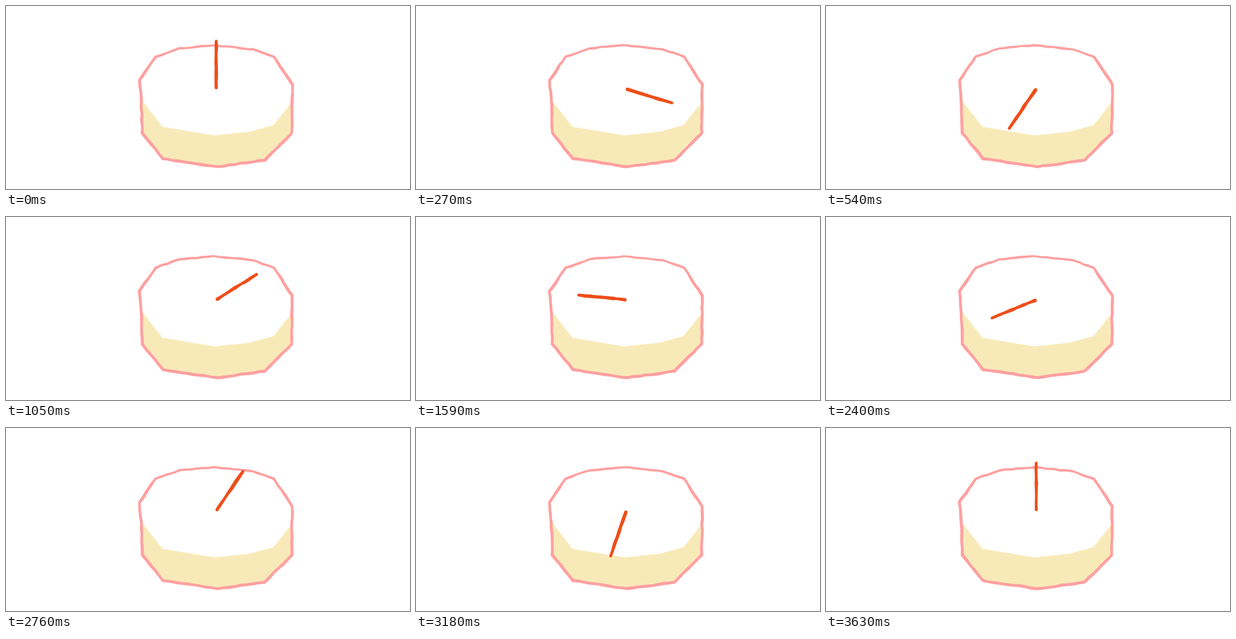
These frames come from a looping animation (772x350 px, 3660 ms). An HTML page with a canvas:

```html
<!DOCTYPE html>
<html lang="en">
<head>
<meta charset="utf-8">
<title>Spinning dial</title>
<style>
  html, body { margin: 0; width: 772px; height: 350px; overflow: hidden; background: #fff; }
  canvas { display: block; }
</style>
</head>
<body>
<canvas id="stage" width="772" height="350"></canvas>
<script>
const ctx = document.getElementById('stage').getContext('2d');
const LOOP = 3660, STEP = 30, LAST = LOOP - STEP;
const PINK = '#ffa0a0', CREAM = '#f8eab8', RED = '#ee4e1a';
const PIVOT = [401.7, 158.5];

const TOP = [[255, 142], [286, 97], [331, 81], [397, 75], [472, 83], [512, 97], [547, 150]];
const BASE = [[546, 243], [494, 295], [404, 307.5], [300, 292], [260.5, 243]];
const ICING = [[260, 181], [299, 231], [398, 247.5], [465, 240.5], [511, 228], [544.5, 186]];

const mix = (a, b, k) => a + (b - a) * k;

function seeded(seed) {
  let s = Math.imul(seed + 1, 2654435761);
  return () => {
    s = (s + 0x6D2B79F5) | 0;
    let x = Math.imul(s ^ (s >>> 15), 1 | s);
    x = (x + Math.imul(x ^ (x >>> 7), 61 | x)) ^ x;
    return ((x ^ (x >>> 14)) >>> 0) / 4294967296;
  };
}

// Splits each edge into short pieces, shakes them sideways and varies the brush radius
function roughen(points, radius, shake, swell, rand) {
  const noise = amount => (rand() * 2 - 1) * amount;
  const out = [];
  for (let i = 0; i < points.length - 1; i++) {
    const [x0, y0] = points[i], [x1, y1] = points[i + 1];
    const len = Math.hypot(x1 - x0, y1 - y0);
    const nx = (y0 - y1) / len, ny = (x1 - x0) / len;
    const count = Math.round(len / 12);
    for (let j = 0; j < count; j++) {
      const k = j ? (j + noise(0.25)) / count : 0;
      const d = noise(j ? shake : shake / 2);
      const y = mix(y0, y1, k);
      out.push([mix(x0, x1, k) + nx * d, y + ny * d, radius(y) + noise(swell)]);
    }
  }
  return out;
}

function brush(points, color) {
  ctx.fillStyle = color;
  ctx.beginPath();
  for (let i = 0; i < points.length - 1; i++) {
    const [x0, y0, r0] = points[i], [x1, y1, r1] = points[i + 1];
    const count = Math.ceil(Math.hypot(x1 - x0, y1 - y0) * 2);
    for (let j = 0; j <= count; j++) {
      const k = j / count, x = mix(x0, x1, k), y = mix(y0, y1, k), r = mix(r0, r1, k);
      ctx.moveTo(x + r, y);
      ctx.arc(x, y, r, 0, Math.PI * 2);
    }
  }
  ctx.fill();
}

// Four turns that gain a little late on and slow down at the end
function handAngle(time) {
  const p = time / LAST;
  return (4 * p + 0.667 * p ** 4 * (1 - p)) * Math.PI * 2;
}

function draw(frame) {
  const rand = seeded(frame);
  ctx.clearRect(0, 0, 772, 350);

  ctx.fillStyle = CREAM;
  ctx.beginPath();
  [...ICING, ...BASE].forEach(([x, y]) => ctx.lineTo(x, y));
  ctx.fill();

  const rimRadius = y => Math.min(2.75, 2.05 + (y - 75) / 70);
  const rim = roughen([...TOP, ...BASE, ICING[0], TOP[0]].map(([x, y], i) => [i === 12 ? x - 1.5 : x, y]), rimRadius, 0.8, 0.25, rand);
  brush([...rim, rim[0]], PINK);

  const angle = handAngle(frame * STEP);
  const at = dist => [PIVOT[0] + Math.sin(angle) * dist, PIVOT[1] - Math.cos(angle) * dist];
  const tip = at(91.3);
  const hand = roughen([at(2.5), tip], () => 3, 0.4, 0.5, rand);
  brush([...hand, [...tip, 2.7]], RED);
}

const start = performance.now();
let shown = -1;
function tick() {
  const frame = Math.floor(((performance.now() - start) % LOOP) / STEP);
  if (frame !== shown) draw(shown = frame);
  requestAnimationFrame(tick);
}
tick();
</script>
</body>
</html>
```
